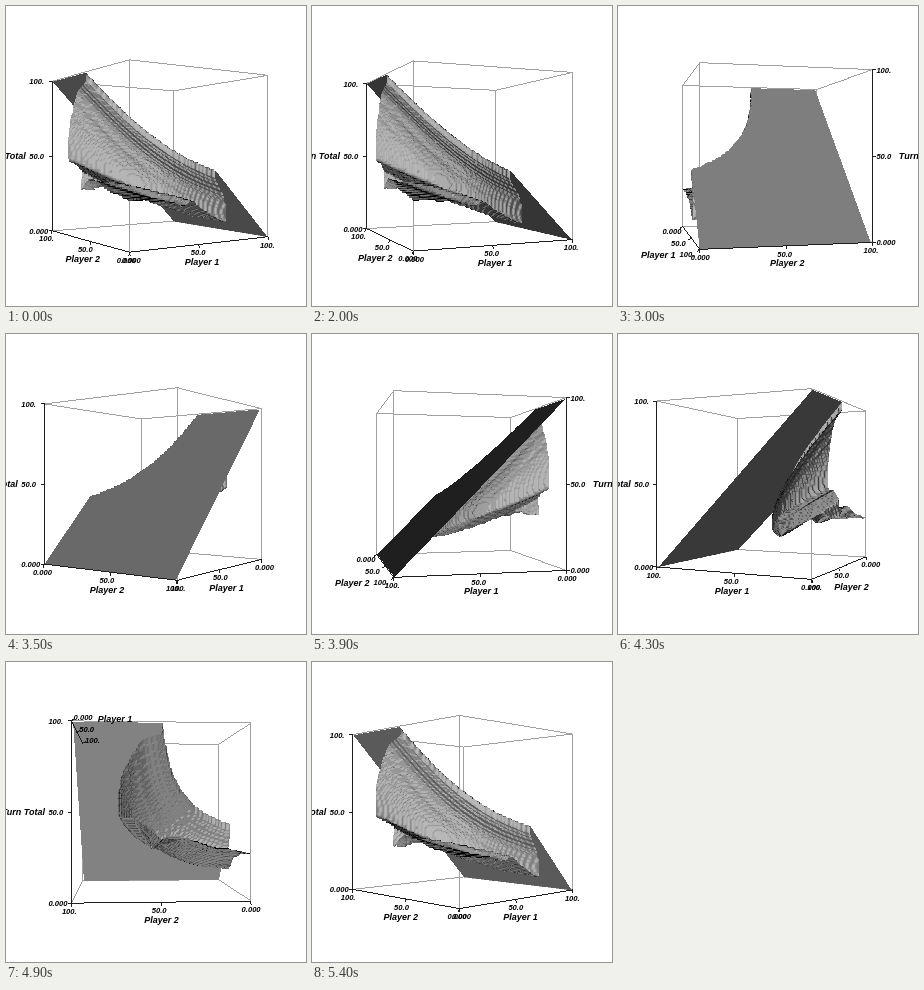
Animation, 300 px wide and 300 px high, one loop 5500 ms. Source, as an HTML page with a canvas:

```html
<!DOCTYPE html>
<html lang="en">
<head>
<meta charset="utf-8">
<title>Roll or hold surface</title>
<style>
  html, body { margin: 0; width: 100%; height: 100%; overflow: hidden; background: #fff; }
  canvas, svg { position: absolute; left: 0; top: 0; width: 100vw; height: 100vh; }
  text { font: italic bold 7.6px "Liberation Sans", Arial, sans-serif; fill: #000; }
  .title { font-size: 9px; text-anchor: middle; }
</style>
</head>
<body>
<canvas id="view" width="300" height="300"></canvas>
<svg id="labels" viewBox="0 0 300 300"></svg>
<script>
const SIZE = 300, GOAL = 100;
const DIMS = [101, 100, 101];
const FOCAL = 560, DISTANCE = 3.605, CENTER_X = 149.95, CENTER_Y = 150;
const START_ANGLE = 123.9, STEP_ANGLE = 10;
const HOLD_MS = 2000, STEP_MS = 100, LOOP_MS = 5500;
const SURFACE_GRAY = 184, OUTLINE_GRAY = 160, AXIS_GRAY = 30;
const SMOOTH_COS = 0.7;
const TITLES = ["Player 1", "Player 2", "Turn Total"];
const VALUES = ["0.000", "50.0", "100."];

// Optimal play of a two-dice game: solid cells are the states where rolling is best.
const solid = new Uint8Array(DIMS[0] * DIMS[1] * DIMS[2]);
const cell = (i, j, k) => (i * DIMS[1] + j) * DIMS[2] + k;

// A single one ends the turn, double ones give 25, other doubles count twice.
function diceOdds() {
  const odds = new Map();
  let bust = 0;
  for (let a = 1; a <= 6; a++) {
    for (let b = 1; b <= 6; b++) {
      if (a !== b && (a === 1 || b === 1)) { bust += 1 / 36; continue; }
      const gain = a !== b ? a + b : a === 1 ? 25 : 4 * a;
      odds.set(gain, (odds.get(gain) || 0) + 1 / 36);
    }
  }
  return { bust, gains: [...odds.keys()], chances: [...odds.values()] };
}

function solveGame() {
  const { bust, gains, chances } = diceOdds();
  const maxGain = Math.max(...gains);
  const win = new Float64Array(GOAL * GOAL).fill(0.5);
  const best = new Float64Array(GOAL + maxGain);

  function turn(i, j, mark) {
    const need = GOAL - i, lose = bust * (1 - win[j * GOAL + i]);
    best.fill(1, need, need + maxGain);
    for (let k = need - 1; k >= 0; k--) {
      let roll = lose;
      for (let n = 0; n < gains.length; n++) roll += chances[n] * best[k + gains[n]];
      const hold = k ? 1 - win[j * GOAL + i + k] : 0;
      best[k] = Math.max(roll, hold);
      if (mark && roll > hold) solid[cell(i, j, k)] = 1;
    }
    return best[0];
  }

  for (let sum = 2 * GOAL - 2; sum >= 0; sum--) {
    for (let i = Math.ceil(sum / 2); i <= Math.min(sum, GOAL - 1); i++) {
      const j = sum - i, here = i * GOAL + j, there = j * GOAL + i;
      for (let pass = 0; pass < 100; pass++) {
        const old = win[here];
        win[there] = turn(j, i);
        win[here] = turn(i, j);
        if (Math.abs(win[here] - old) < 1e-9) break;
      }
      turn(i, j, true);
      turn(j, i, true);
    }
  }
}

// Boundary of the solid: one or more polygons per grid cube, cut into triangles.
function buildMesh() {
  const points = [], triangles = [], known = new Map();
  const rings = [];
  for (let axis = 0; axis < 3; axis++) {
    const u = 1 << (axis + 1) % 3, v = 1 << (axis + 2) % 3;
    for (const base of [0, 1 << axis]) {
      const ring = [base, base | u, base | u | v, base | v];
      rings.push(base ? ring : ring.reverse());
    }
  }
  const edgeId = (a, b) => Math.min(a, b) * 8 + Math.max(a, b);

  function vertex(origin, edge) {
    const twice = origin.map((c, axis) => 2 * c + (edge >> 3 + axis & 1) + (edge >> axis & 1));
    const key = (twice[0] * 256 + twice[1]) * 256 + twice[2];
    if (!known.has(key)) {
      known.set(key, points.length / 3);
      points.push(...twice.map(c => c / 200 - 0.5));
    }
    return known.get(key);
  }

  function addCube(origin, mask) {
    const next = new Map(), inside = c => mask >> c & 1;
    for (const ring of rings) {
      for (let q = 0; q < 4; q++) {
        const a = ring[q], b = ring[q + 1 & 3];
        if (!inside(a) || inside(b)) continue;
        let m = q + 1;
        while (!inside(ring[m + 1 & 3])) m++;
        next.set(edgeId(a, b), edgeId(ring[m & 3], ring[m + 1 & 3]));
      }
    }
    while (next.size) {
      const loop = [];
      let edge = next.keys().next().value;
      while (next.has(edge)) {
        loop.push(vertex(origin, edge));
        const follow = next.get(edge);
        next.delete(edge);
        edge = follow;
      }
      for (let n = 2; n < loop.length; n++) triangles.push(loop[0], loop[n - 1], loop[n]);
    }
  }

  const offsets = Array.from({ length: 8 }, (_, c) => cell(c & 1, c >> 1 & 1, c >> 2));
  for (let i = 0; i < DIMS[0] - 1; i++)
    for (let j = 0; j < DIMS[1] - 1; j++)
      for (let k = 0; k < DIMS[2] - 1; k++) {
        const at = cell(i, j, k);
        let mask = 0;
        for (let c = 0; c < 8; c++) mask |= solid[at + offsets[c]] << c;
        if (mask && mask < 255) addCube([i, j, k], mask);
      }
  return { points: Float32Array.from(points), triangles: Uint32Array.from(triangles) };
}

// One normal per triangle corner, smoothed over neighbours that bend only slightly.
function cornerNormals({ points, triangles }) {
  const faces = new Float32Array(triangles.length);
  const around = Array.from({ length: points.length / 3 }, () => []);
  for (let n = 0; n < triangles.length; n += 3) {
    const [a, b, c] = [0, 1, 2].map(m => triangles[n + m] * 3);
    const e = [0, 1, 2].map(m => points[b + m] - points[a + m]);
    const f = [0, 1, 2].map(m => points[c + m] - points[a + m]);
    const normal = [e[1] * f[2] - e[2] * f[1], e[2] * f[0] - e[0] * f[2], e[0] * f[1] - e[1] * f[0]];
    const length = Math.hypot(...normal) || 1;
    for (let m = 0; m < 3; m++) {
      faces[n + m] = normal[m] / length;
      around[triangles[n + m]].push(n);
    }
  }
  const normals = new Float32Array(triangles.length * 3);
  for (let corner = 0; corner < triangles.length; corner++) {
    const own = corner - corner % 3;
    let x = 0, y = 0, z = 0;
    for (const f of around[triangles[corner]]) {
      const bend = faces[own] * faces[f] + faces[own + 1] * faces[f + 1] + faces[own + 2] * faces[f + 2];
      if (bend < SMOOTH_COS) continue;
      x += faces[f];
      y += faces[f + 1];
      z += faces[f + 2];
    }
    const length = Math.hypot(x, y, z) || 1;
    normals.set([x / length, y / length, z / length], corner * 3);
  }
  return normals;
}

solveGame();
const mesh = buildMesh();
const { points, triangles } = mesh;
const normals = cornerNormals(mesh);
const count = points.length / 3;
const px = new Float32Array(count), py = new Float32Array(count), near = new Float32Array(count);
const light = new Float32Array(triangles.length);

const context = document.getElementById("view").getContext("2d");
const image = context.createImageData(SIZE, SIZE);
const pixels = new Uint32Array(image.data.buffer);
const depth = new Float32Array(SIZE * SIZE);
const gray = g => (0xff000000 | Math.round(g) * 0x10101) >>> 0;

// Screen position, plus the scale there as a measure of nearness.
function project(x, y, z, sin, cos) {
  const scale = FOCAL / (DISTANCE - (x * cos - y * sin));
  return [CENTER_X + (x * sin + y * cos) * scale, CENTER_Y - z * scale, scale];
}

function fillTriangle(n) {
  const a = triangles[n], b = triangles[n + 1], c = triangles[n + 2];
  const ax = px[a], ay = py[a], bx = px[b], by = py[b], cx = px[c], cy = py[c];
  const area = (bx - ax) * (cy - ay) - (cx - ax) * (by - ay);
  if (!area) return;
  const side = light[n] + light[n + 1] + light[n + 2] < 0 ? -1 : 1;
  const la = Math.max(0, side * light[n]);
  const lb = Math.max(0, side * light[n + 1]);
  const lc = Math.max(0, side * light[n + 2]);
  const x0 = Math.ceil(Math.min(ax, bx, cx) - 0.5), x1 = Math.floor(Math.max(ax, bx, cx) - 0.5);
  const y0 = Math.ceil(Math.min(ay, by, cy) - 0.5), y1 = Math.floor(Math.max(ay, by, cy) - 0.5);
  for (let y = y0; y <= y1; y++) {
    for (let x = x0; x <= x1; x++) {
      const dx = x + 0.5 - ax, dy = y + 0.5 - ay;
      const v = (dx * (cy - ay) - (cx - ax) * dy) / area;
      const w = ((bx - ax) * dy - dx * (by - ay)) / area;
      const u = 1 - v - w;
      if (u < -1e-6 || v < -1e-6 || w < -1e-6) continue;
      const s = u * near[a] + v * near[b] + w * near[c], at = y * SIZE + x;
      if (s <= depth[at]) continue;
      depth[at] = s;
      pixels[at] = gray(SURFACE_GRAY * Math.min(1, u * la + v * lb + w * lc));
    }
  }
}

function drawLine(a, b, shade, onTop) {
  const steps = Math.ceil(Math.max(Math.abs(b[0] - a[0]), Math.abs(b[1] - a[1]), 1));
  for (let n = 0; n <= steps; n++) {
    const t = n / steps;
    const x = Math.floor(a[0] + (b[0] - a[0]) * t), y = Math.floor(a[1] + (b[1] - a[1]) * t);
    if (x < 0 || y < 0 || x >= SIZE || y >= SIZE) continue;
    const at = y * SIZE + x;
    if (onTop || !depth[at]) pixels[at] = gray(shade);
  }
}

// Picks three outer box edges for the axes; corner bits are the three coordinates.
function chooseAxes(box) {
  const reach = p => Math.hypot(p[0], SIZE - p[1]);
  let origin = 0;
  box.forEach((p, c) => { if (reach(p) < reach(box[origin])) origin = c; });
  const edges = [0, 1, 2].map(axis => {
    const p = box[origin ^ 1 << axis], dx = p[0] - box[origin][0], dy = box[origin][1] - p[1];
    const length = Math.hypot(dx, dy);
    return { axis, dx, slope: dy / dx, ux: dx / length, uy: dy / length };
  });
  const first = edges.filter(e => e.dx > 0.001).sort((a, b) => a.slope - b.slope)[0];
  const along = e => e.ux * first.ux + e.uy * first.uy;
  const second = edges.filter(e => e !== first).sort((a, b) => along(a) - along(b))[0];
  const axis = 3 - first.axis - second.axis;
  const c1 = origin ^ 1 << first.axis, c2 = origin ^ 1 << second.axis;
  const e1 = c1 ^ 1 << axis, e2 = c2 ^ 1 << axis;
  const third = box[e1][2] > box[e2][2] ? { axis, from: c1, to: e1 } : { axis, from: e2, to: c2 };
  return [
    { axis: first.axis, from: origin, to: c1 },
    { axis: second.axis, from: c2, to: origin },
    third
  ];
}

const svg = document.getElementById("labels");
function makeText(content, name) {
  const node = document.createElementNS("http://www.w3.org/2000/svg", "text");
  node.textContent = content;
  if (name) node.setAttribute("class", name);
  return svg.appendChild(node);
}
function place(node, x, y) {
  node.setAttribute("x", x.toFixed(1));
  node.setAttribute("y", y.toFixed(1));
}
const axisTexts = TITLES.map(title => ({
  title: makeText(title, "title"),
  values: VALUES.map(value => makeText(value))
}));

function drawAxis({ axis, from, to }, box) {
  const a = box[from], b = box[to];
  const length = Math.hypot(b[0] - a[0], b[1] - a[1]);
  const nx = -(b[1] - a[1]) / length, ny = (b[0] - a[0]) / length;
  const texts = axisTexts[axis], rising = to >> axis & 1;
  const spot = t => [a[0] + (b[0] - a[0]) * t, a[1] + (b[1] - a[1]) * t];
  drawLine(a, b, AXIS_GRAY, true);
  texts.values.forEach((node, n) => {
    const [x, y] = spot(rising ? n / 2 : 1 - n / 2);
    drawLine([x, y], [x + nx * 3, y + ny * 3], AXIS_GRAY, true);
    place(node, x + nx * 13.3 - 9.5, y + ny * 7.8 + 3);
  });
  const [mx, my] = spot(0.5), lean = Math.abs(nx);
  const extra = axis === 2 ? 3 : 0;
  place(texts.title, mx + nx * (26 + (19 + extra) * lean), my + ny * (17 + 16 * nx * nx) + 3.4);
}

function render(step) {
  const angle = (START_ANGLE - STEP_ANGLE * step) * Math.PI / 180;
  const sin = Math.sin(angle), cos = Math.cos(angle);
  pixels.fill(0xffffffff);
  depth.fill(0);
  for (let n = 0; n < count; n++) {
    const p = project(points[n * 3], points[n * 3 + 1], points[n * 3 + 2], sin, cos);
    px[n] = p[0];
    py[n] = p[1];
    near[n] = p[2];
  }
  for (let n = 0; n < light.length; n++) light[n] = normals[n * 3] * cos - normals[n * 3 + 1] * sin;
  for (let n = 0; n < triangles.length; n += 3) fillTriangle(n);

  const box = Array.from({ length: 8 }, (_, c) =>
    project((c & 1) - 0.5, (c >> 1 & 1) - 0.5, (c >> 2) - 0.5, sin, cos));
  for (let c = 0; c < 8; c++)
    for (let axis = 0; axis < 3; axis++)
      if (!(c >> axis & 1)) drawLine(box[c], box[c | 1 << axis], OUTLINE_GRAY);
  for (const edge of chooseAxes(box)) drawAxis(edge, box);
  context.putImageData(image, 0, 0);
}

let shown = 0;
render(0);
const start = performance.now();
function tick() {
  const time = (performance.now() - start) % LOOP_MS;
  const step = time < HOLD_MS ? 0 : 1 + Math.floor((time - HOLD_MS) / STEP_MS);
  if (step !== shown) render(shown = step);
  requestAnimationFrame(tick);
}
requestAnimationFrame(tick);
</script>
</body>
</html>
```
